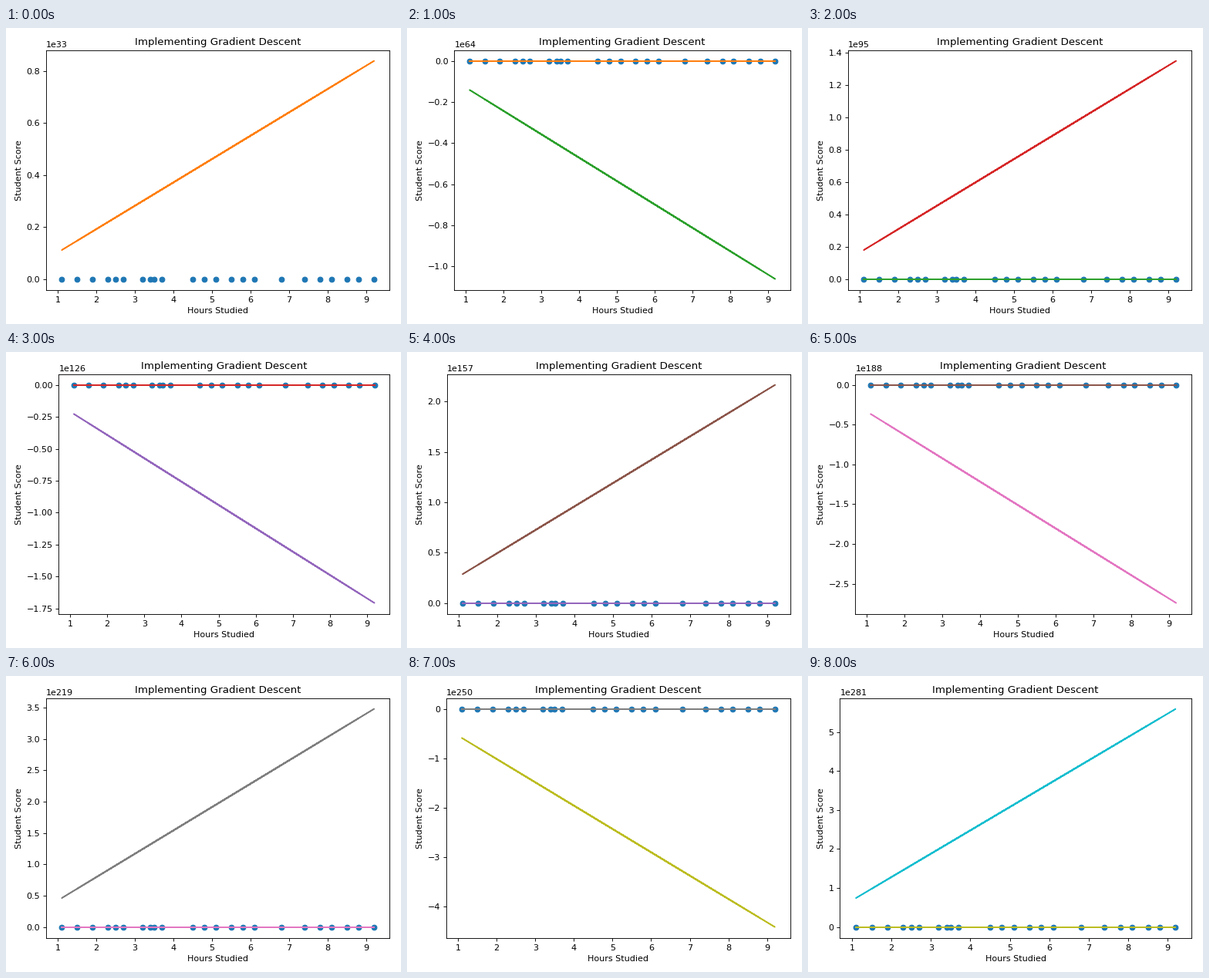
A matplotlib script for the animation above (10000 ms loop, 512 px wide and 384 px high).

```python
import numpy as np
import matplotlib.pyplot as plt
from matplotlib.animation import FuncAnimation

WIDTH, HEIGHT, DPI = 512, 384, 80
STUDENTS = 23
STEPS = 9            # the last step is held for two frames
START = 8.38e32      # height of the first fit at the longest study time
GROWTH = -1.2677e31  # the diverging fit flips sign at every step
BIAS = 0.139         # intercept of the fit relative to its slope
RIGHT_EDGE = 497.1   # px

# Study times run evenly between a few key students, in shuffled order.
ranks = [0, 3, 5, 6, 9, 10, 15, 17, 22]
key_hours = [1.1, 2.3, 2.7, 3.2, 3.7, 4.5, 6.1, 7.4, 9.2]
order = np.random.default_rng(4).permutation(STUDENTS)
hours = np.interp(order, ranks, key_hours).round(1)
scores = 9.6 * hours + 2.5
fit = (hours + BIAS) / (hours.max() + BIAS)

plt.rcParams.update({"font.family": "DejaVu Sans", "font.size": 10})
fig, ax = plt.subplots(figsize=(WIDTH / DPI, HEIGHT / DPI), dpi=DPI)


def peak(step):
    return START * GROWTH ** step


def draw(frame):
    last = min(frame, STEPS - 1)
    ax.clear()
    ax.plot(hours, scores, "o")
    for step in range(last + 1):
        ax.plot(hours, peak(step) * fit)
    ax.set_title("Implementing Gradient Descent")
    ax.set_xlabel("Hours Studied")
    ax.set_ylabel("Student Score")

    # Scale the labels by the power of ten of the tick just past the peak.
    power = int(np.floor(np.log10(1.2 * abs(peak(last)))))
    ax.ticklabel_format(axis="y", style="sci", scilimits=(power, power))

    fig.subplots_adjust(left=0.125, right=0.9, bottom=0.11, top=0.88)
    fig.tight_layout()
    fig.subplots_adjust(right=RIGHT_EDGE / WIDTH)
    return ax.get_children()


anim = FuncAnimation(fig, draw, frames=STEPS + 1, init_func=lambda: draw(0),
                     interval=1000, repeat=True, repeat_delay=0, blit=False)
plt.show()
```
